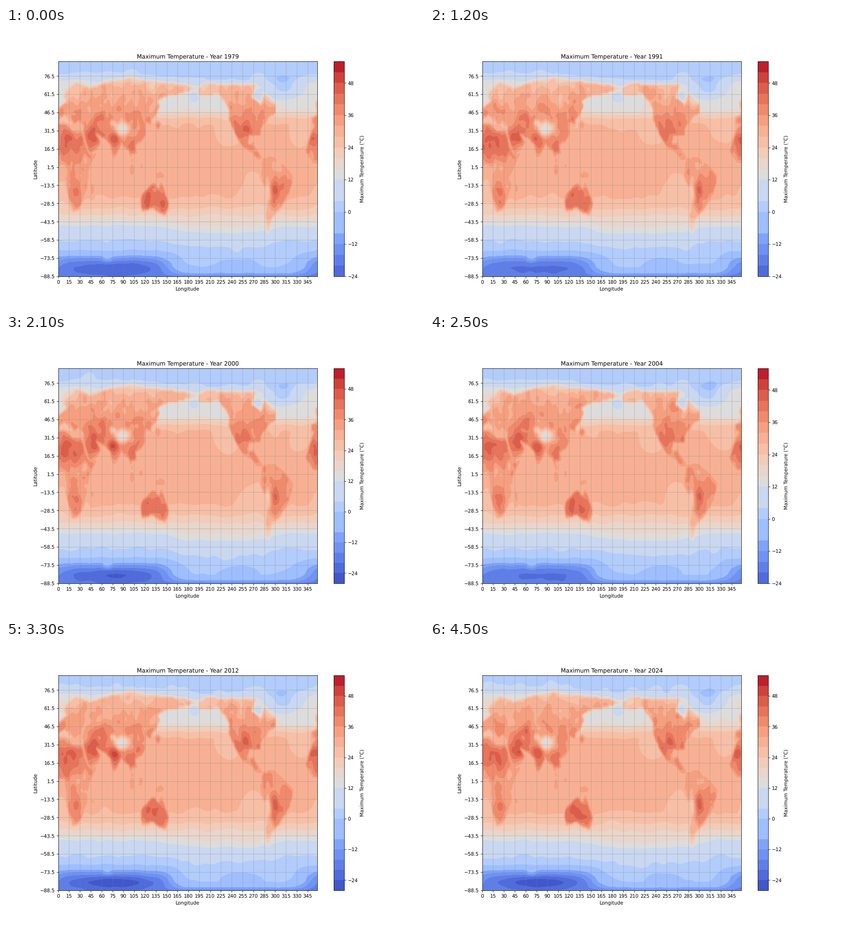
These frames come from a looping animation (917 by 611 pixels, 4600 ms). A matplotlib script:

```python
import numpy as np
import matplotlib.pyplot as plt
from matplotlib.animation import FuncAnimation
from matplotlib.cm import ScalarMappable
from matplotlib.colors import BoundaryNorm, ListedColormap
from matplotlib.path import Path

W, H, DPI = 917, 611, 76.4
FIRST, LAST = 1979, 2024
plt.rcParams['text.hinting'] = 'none'

X, Y = np.meshgrid(np.arange(0, 360, 1.5), np.arange(-88.5, 89, 1.5))

# Rough coastlines, (longitude, latitude)
AFRICA = [(-6, 36), (10, 37), (20, 31), (32, 31), (39, 16), (44, 11), (51, 12),
          (41, -2), (40, -15), (33, -27), (27, -34), (19, -35), (12, -16), (9, 4),
          (-8, 5), (-17, 14), (-10, 29)]
EURASIA = [(-2, 49), (-2, 44), (-9, 43), (-9, 37), (-2, 37), (3, 43), (9, 44),
           (17, 40), (14, 45), (23, 37), (27, 40), (36, 36), (35, 30), (43, 13),
           (52, 16), (59, 22), (50, 30), (66, 25), (72, 20), (77, 8), (87, 21),
           (94, 16), (98, 16), (103, 3), (101, 13), (109, 12), (106, 20),
           (114, 22), (121, 28), (121, 39), (129, 36), (128, 40), (135, 44),
           (141, 53), (136, 56), (154, 61), (163, 61), (180, 64), (189, 66),
           (178, 69), (140, 72), (113, 74), (105, 77), (92, 75), (70, 72),
           (44, 67), (25, 71), (12, 65), (7, 59), (13, 56), (4, 52)]
NORTH_AMERICA = [(193, 66), (195, 61), (205, 61), (222, 62), (236, 50), (236, 41),
                 (245, 29), (255, 19), (268, 14), (276, 8), (282, 8), (273, 17),
                 (270, 21), (262, 20), (263, 28), (279, 28), (280, 33), (290, 42),
                 (300, 46), (301, 53), (285, 62), (281, 53), (267, 59), (273, 69),
                 (232, 70), (204, 71)]
SOUTH_AMERICA = [(283, 8), (298, 10), (310, 4), (325, -6), (319, -21), (306, -34),
                 (295, -41), (291, -54), (287, -50), (289, -20), (279, -5)]
AUSTRALIA = [(114, -22), (131, -12), (140, -17), (142, -11), (153, -28),
             (149, -38), (140, -37), (131, -31.5), (116, -35)]
ISLANDS = [(358, 53, 2, 4), (47, -19, 2, 6), (102, -1, 2, 4), (114, 1, 3, 3),
           (141, -5, 6, 2), (138, 36, 3, 3)]

# Latitude profiles, (latitude, degrees)
SEA = [(-88.5, -16), (-86, -8), (-81, 0), (-68, 2.5), (-59, 4), (-47, 12), (-43, 16),
       (-38.5, 20), (-33, 24), (-24, 28), (-10, 30.5), (15, 30.5), (37, 28),
       (42, 24), (45, 20), (48, 16), (70, 12), (76, 4), (88.5, 2)]
LAND = [(-55, 16), (-40, 28), (-28, 35), (-12, 35.5), (0, 33.5), (12, 36.5),
        (25, 39), (42, 36), (62, 31), (70, 27), (77, 16)]
ICE = [(-88.5, -18.5), (-81, -18.5), (-77, -16.5), (-73, -11), (-70, -5), (-67, 0.5),
       (-62, 3.4)]

# Local departures: lon, lat, half width, half height, degrees
HOT = [(10, 21, 30, 11, 6), (48, 29, 11, 8, 7), (78, 25, 7, 7, 8), (60, 43, 9, 7, 6),
       (24, -21, 9, 10, 4), (133, -26, 24, 15, 9), (300, -23, 5, 12, 7),
       (307, -9, 12, 9, 3), (258, 36, 16, 9, 5), (101, 18, 6, 6, 3)]
COOL = [(88, 33, 11, 5.5, -25), (75, 38, 4, 3, -14), (289, -18, 4, 11, -12),
        (293, 56, 10, 6, -6), (207, 64, 14, 5, -3), (12, 63, 14, 7, -5),
        (38, 8, 4, 5, -7)]
CURRENTS = [(312, 67, 22, 9, -10), (236, 28, 18, 11, -4), (335, 27, 15, 10, -3),
            (272, -14, 22, 14, -3.5), (5, -18, 12, 14, -3), (10, 66, 25, 8, 3),
            (188, 58, 9, 5, -3.5), (276, 59, 5, 4, -5), (277, 73, 10, 6, 3)]


def blur(a, s):
    ky = np.fft.fftfreq(a.shape[0])[:, None]
    kx = np.fft.rfftfreq(a.shape[1])
    gain = np.exp(-2 * (np.pi * s) ** 2 * (kx ** 2 + ky ** 2))
    return np.fft.irfft2(np.fft.rfft2(a) * gain, a.shape)


def noise(rng, s):
    n = blur(rng.standard_normal(X.shape), s)
    return n / n.std()


def away(x):
    return (X - x + 180) % 360 - 180


def bump(x, y, sx, sy, amp):
    r2 = (away(x) / sx) ** 2 + ((Y - y) / sy) ** 2
    return amp * np.exp(-r2 ** 1.3)


def bumps(items):
    return sum(bump(*b) for b in items)


def profile(keys, y):
    return np.interp(y, *zip(*keys))


def land_mask():
    m = np.zeros(X.shape, bool)
    for poly in (AFRICA, EURASIA, NORTH_AMERICA, SOUTH_AMERICA, AUSTRALIA):
        for turn in (0, 360):
            pts = np.column_stack([X.ravel() - turn, Y.ravel()])
            m |= Path(poly).contains_points(pts).reshape(X.shape)
    for x, y, rx, ry in ISLANDS:
        m |= (away(x) / rx) ** 2 + ((Y - y) / ry) ** 2 <= 1
    return np.clip(blur(m.astype(float), 0.65), 0, 1)


def sea_field():
    # bands sag southwards in the South Pacific and rise north of Eurasia
    sag = 6 * np.exp(-(away(225) / 75) ** 4) * np.clip((-38 - Y) / 12, 0, 1)
    sag *= np.clip((Y + 82) / 14, 0, 1)
    rise = 3 * np.cos(np.radians(X - 60)) * np.clip((Y - 55) / 15, 0, 1)
    t = profile(SEA, Y + sag - rise) + bumps(CURRENTS)
    # high plateau of the eastern Antarctic
    east = np.exp(-(away(70) / 92) ** 6)
    t += east * np.clip((-60 - Y) / 4, 0, 1) * (profile(ICE, Y) - t)
    return t + bump(68, -74, 7, 3, 5) + bump(250, -78, 24, 5, -4)


mask = land_mask()
sea = sea_field()
land = profile(LAND, Y) + bumps(HOT) + bumps(COOL)
land += 1.2 * noise(np.random.default_rng(7), 1.5)


def field(year):
    rng = np.random.default_rng(year)
    s = sea + 0.35 * noise(rng, 4)
    g = land + 1.2 * noise(rng, 2.5)
    t = s + (g - s) * mask + 0.012 * (year - 2000)
    cold = 5 + 3 * np.cos(2 * np.pi * (year - 1997) / 14)
    t -= bump(80, -82, 55, 6, cold) + bump(318, 75, 9, 5, rng.uniform(0, 3))
    return np.clip(t, -27.9, 55.9)


def scale(low):
    levels = np.arange(low, 57, 4)
    mids = levels[:-1] + 2.0
    # the pale blue steps share a tone in pairs
    mids[(mids == 6) | (mids == 10)] = 8
    mids[(mids == -6) | (mids == -2)] = -3
    cmap = ListedColormap(plt.get_cmap('coolwarm')((mids + 28) / 84))
    return levels, cmap, BoundaryNorm(levels, cmap.N)


fig = plt.figure(figsize=((W + 0.01) / DPI, (H + 0.01) / DPI), dpi=DPI)
ax = fig.add_axes([0.125, 0.11, 0.62, 0.77])
ax.set(xlabel='Longitude', ylabel='Latitude', xlim=(0, 358.5), ylim=(-88.5, 88.5),
       xticks=range(0, 360, 15), yticks=np.arange(-88.5, 88, 15))
ax.grid(True, color='gray', linestyle='--', linewidth=0.5)

scales = {low: scale(low) for low in (-24, -28)}
bars = {}
for low, (levels, cmap, norm) in scales.items():
    cax = fig.add_axes([0.78375, 0.11, 0.02565, 0.77])
    bar = fig.colorbar(ScalarMappable(norm, cmap), cax=cax, ticks=range(-24, 49, 12),
                       spacing='proportional', label='Maximum Temperature (°C)')
    bar.minorticks_off()
    bars[low] = cax


def draw(i):
    year = FIRST + i
    t = field(year)
    low = -28 if t.min() < -24 else -24
    levels, cmap, norm = scales[low]
    for c in [*ax.collections]:
        c.remove()
    ax.contourf(X, Y, t, levels=levels, cmap=cmap, norm=norm)
    ax.set_title(f'Maximum Temperature - Year {year}')
    for key, cax in bars.items():
        cax.set_visible(key == low)
    return []


anim = FuncAnimation(fig, draw, frames=LAST - FIRST + 1, interval=100, repeat=True)
plt.show()
```
